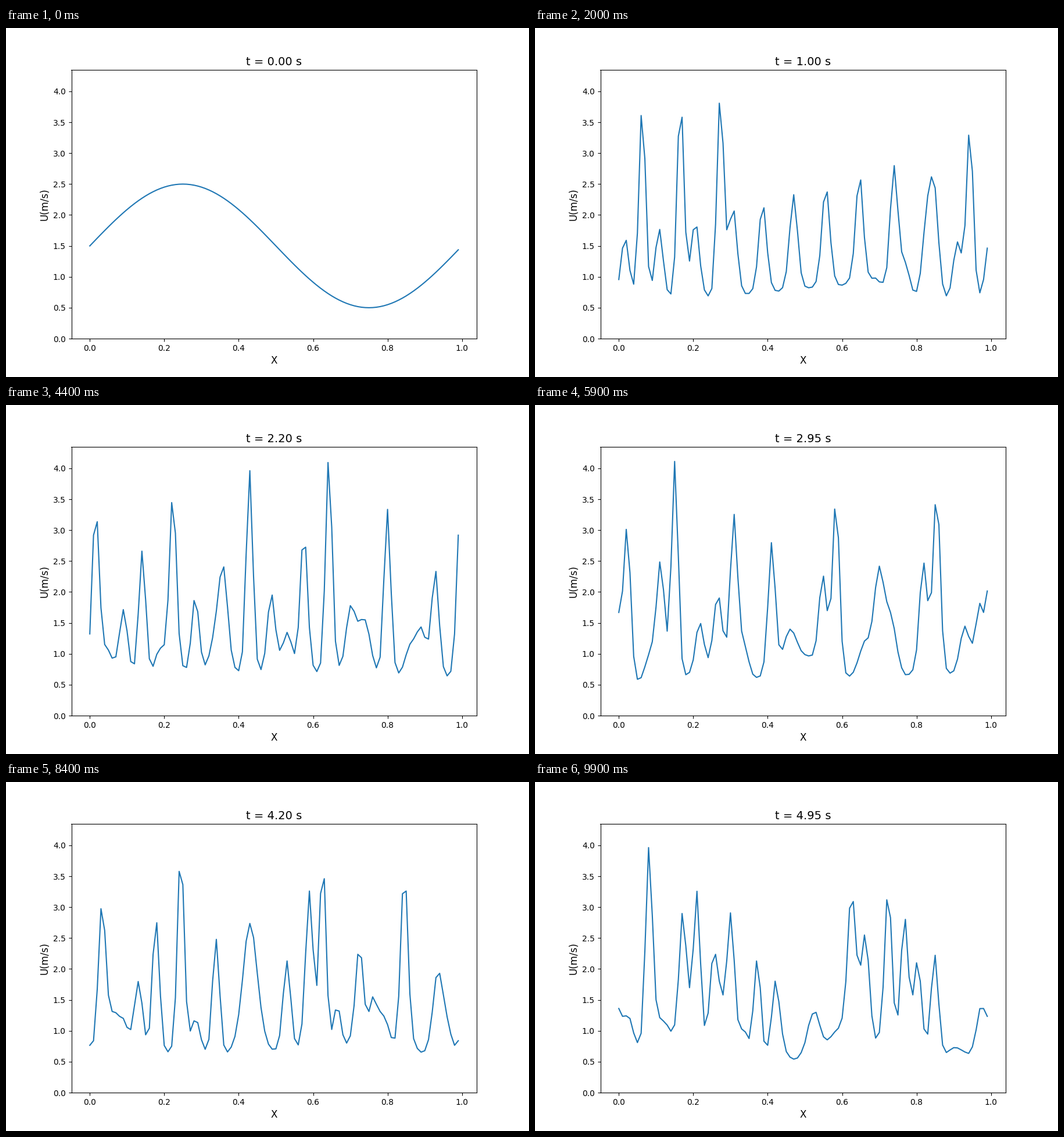
A matplotlib script for the animation above (10 s loop, 900x600 px).

```python
"""Nonlinear advection u_t + (u^2/2)_x = 0 on a periodic grid, leapfrog in time."""
import matplotlib.pyplot as plt
import numpy as np
from matplotlib.animation import FuncAnimation

FRAMES, INTERVAL = 100, 100
DX, DT = 0.01, 0.001
STEPS_PER_FRAME = 50
X = np.arange(100) * DX
U0 = 1.5 + np.sin(2 * np.pi * X)


def leapfrog(prev, cur):
    """Step from prev over cur with fluxes taken at the cell faces."""
    face = (cur[:-1] + cur[1:]) / 2
    new = np.empty_like(cur)
    new[1:-1] = prev[1:-1] - DT / DX * np.diff(face ** 2)
    new[0], new[-1] = new[-2], new[1]
    return new


def solve():
    states = [U0]
    prev = cur = U0  # both starting levels hold the initial wave
    for step in range(2, STEPS_PER_FRAME * (FRAMES - 1) + 1):
        prev, cur = cur, leapfrog(prev, cur)
        if step % STEPS_PER_FRAME == 0:
            states.append(cur)
    return states


states = solve()

fig, ax = plt.subplots(figsize=(9, 6), dpi=100)
line, = ax.plot(X, U0, color="#1f77b4", lw=1.5)
ax.set_ylim(0, 4.348)
ax.set_xlabel("X", fontsize=12)
ax.set_ylabel("U(m/s)", fontsize=12)
title = ax.set_title("", fontsize=14)


def draw(i):
    line.set_ydata(states[i])
    title.set_text(f"t = {i * STEPS_PER_FRAME * DT:.2f} s")
    return line, title


anim = FuncAnimation(fig, draw, frames=FRAMES, interval=INTERVAL, repeat=True)
plt.show()
```
